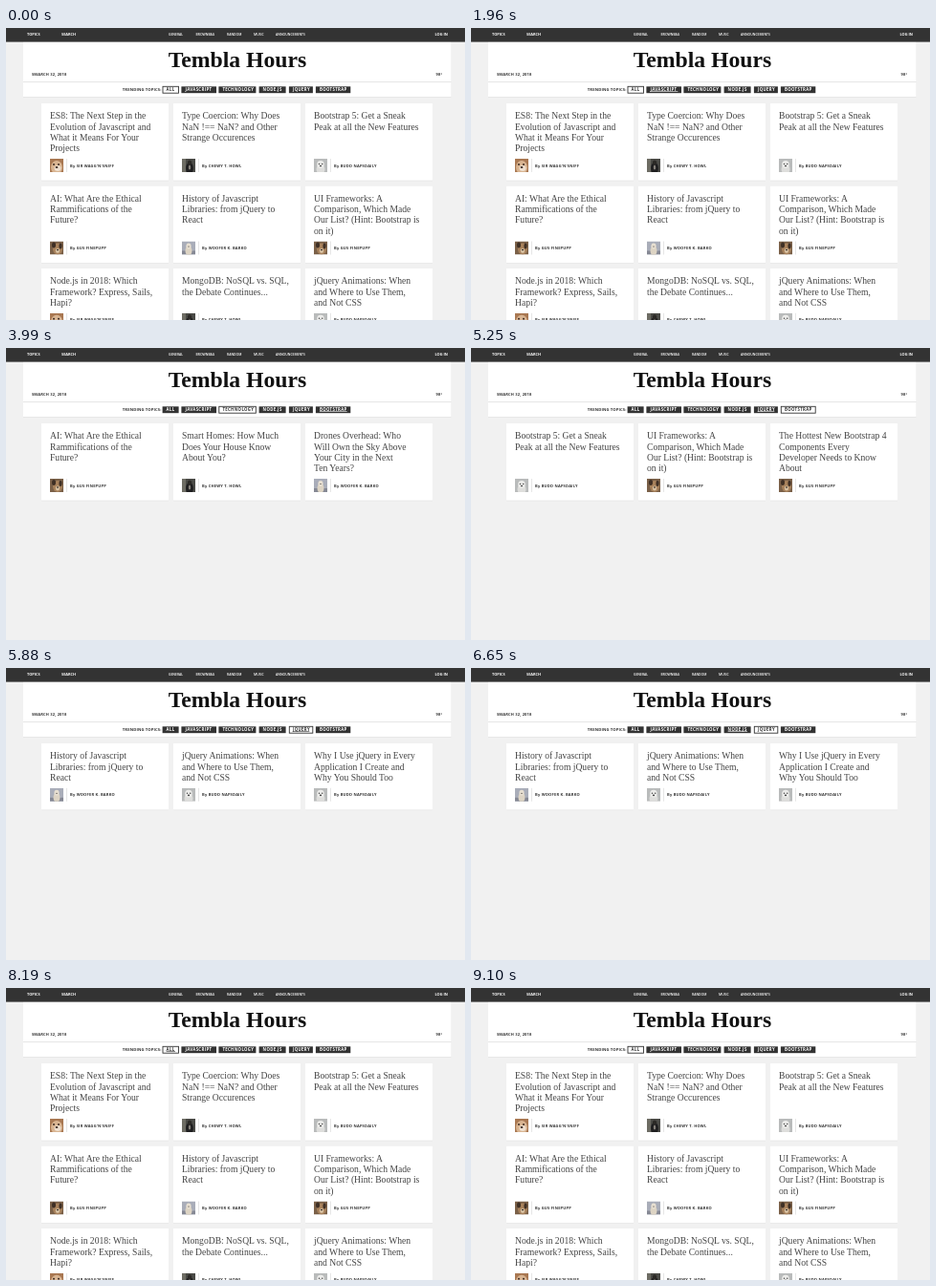
Animation, 480 px wide and 306 px high, one loop 9170 ms. Source, as an HTML page:

```html
<!DOCTYPE html>
<html lang="en">
<head>
<meta charset="utf-8">
<title>Tembla Hours</title>
<style>
  html, body { margin: 0; width: 100%; height: 100%; overflow: hidden; background: #f1f1f1; }
  svg { display: block; }
  text { font-family: "Open Sans", "Noto Sans", sans-serif; fill: #333; white-space: pre; }
  .title { font: bold 23.7px "Liberation Serif", "Noto Serif", serif; fill: #111; text-anchor: middle; }
  .head { font: 9.6px "Liberation Serif", "Noto Serif", serif; fill: #444; }
  .by { font-size: 4px; font-weight: 700; letter-spacing: .22px; }
  .tab { font-size: 4.3px; font-weight: 700; letter-spacing: .36px; }
  .label { font-size: 4.2px; font-weight: 700; letter-spacing: .12px; }
  .info { font-size: 4px; font-weight: 700; letter-spacing: .17px; }
  .main { font-size: 3.9px; font-weight: 700; fill: #fff; }
  .nav { font-size: 3.4px; font-weight: 600; fill: #fff; }
</style>
</head>
<body>
<svg id="stage" width="480" height="306" viewBox="0 0 480 306"></svg>
<script>
const LOOP = 9170;
const stage = document.getElementById('stage');

const rect = (x, y, w, h, fill, extra = '') =>
  `<rect x="${x}" y="${y}" width="${w}" height="${h}" fill="${fill}" ${extra}/>`;
const text = (cls, x, y, s, extra = '') =>
  `<text class="${cls}" x="${x}" y="${y}" ${extra}>${s}</text>`;
const oval = (x, y, rx, ry, fill) =>
  `<ellipse cx="${x}" cy="${y}" rx="${rx}" ry="${ry}" fill="${fill}"/>`;

// Author name and a 14 x 14 portrait of flat shapes
const authors = {
  sir: ["SIR WAGG'N'SNIFF", rect(0, 0, 14, 14, '#a97852') + oval(7, 9, 6, 7, '#d9b592') +
    oval(8, 10, 3.5, 3, '#efe0d0') + oval(4, 6, 1, 1, '#3b2a22') + oval(9, 6, 1, 1, '#3b2a22') + oval(7, 9, 1.4, 1, '#3b2a22')],
  bones: ['CHEWY T. HOWL', rect(0, 0, 14, 14, '#4a4a46') + rect(0, 0, 4, 14, '#6d6c63') +
    oval(8, 10, 4, 6, '#1f1f20') + oval(8, 4, 2.2, 2.6, '#2b2926') + oval(8, 9, 1.2, 2.5, '#85807a')],
  fido: ['BUDD NAPSDAILY', rect(0, 0, 14, 14, '#b9bbbb') + oval(7, 11, 4.5, 5, '#dededc') +
    oval(7, 6, 3.8, 4, '#ececea') + oval(5.5, 5.5, .8, .8, '#555') + oval(8.7, 5.5, .8, .8, '#555') + oval(7, 7.6, 1.1, .8, '#444')],
  max: ['GUS FINEPUPP', rect(0, 0, 14, 14, '#7a6048') + oval(8, 8, 5, 6, '#a8825c') +
    oval(4, 4, 2, 3, '#3e2f25') + oval(11, 5, 1.6, 3, '#3e2f25') + oval(8, 10, 2.2, 2.4, '#d8c1a2') + oval(8, 9, 1, .8, '#29211d')],
  pupper: ['WOOFER K. BARKO', rect(0, 0, 14, 14, '#a9adb9') + rect(0, 10, 14, 4, '#858894') +
    oval(7, 10, 3.5, 5, '#ddd4c4') + oval(7, 5, 2.6, 3, '#e8e0d2') + oval(7, 5.5, .8, .6, '#5c5650')]
};

const articles = {
  es8: ['sir', 'ES8: The Next Step in the|Evolution of Javascript and|What it Means For Your|Projects'],
  nan: ['bones', 'Type Coercion: Why Does|NaN !== NaN? and Other|Strange Occurences'],
  boot: ['fido', 'Bootstrap 5: Get a Sneak|Peak at all the New Features'],
  ai: ['max', 'AI: What Are the Ethical|Rammifications of the|Future?'],
  hist: ['pupper', 'History of Javascript|Libraries: from jQuery to|React'],
  ui: ['max', 'UI Frameworks: A|Comparison, Which Made|Our List? (Hint: Bootstrap is|on it)'],
  node: ['sir', 'Node.js in 2018: Which|Framework? Express, Sails,|Hapi?'],
  mongo: ['bones', 'MongoDB: NoSQL vs. SQL,|the Debate Continues...'],
  anim: ['fido', 'jQuery Animations: When|and Where to Use Them,|and Not CSS'],
  rest: ['pupper', "When to Rest, When to|Spread: Why There Are Two|Meanings Behind '...'"],
  ts: ['sir', 'Typescript: Ten Things you|Should Know Before|Building Your Next Angular|Application'],
  hot: ['max', 'The Hottest New Bootstrap 4|Components Every|Developer Needs to Know|About'],
  why: ['fido', 'Why I Use jQuery in Every|Application I Create and|Why You Should Too'],
  home: ['bones', 'Smart Homes: How Much|Does Your House Know|About You?'],
  drone: ['pupper', 'Drones Overhead: Who|Will Own the Sky Above|Your City in the Next|Ten Years?']
};

// label, text x, box width, articles
const tabs = [
  ['ALL', 167.6, 17, 'es8 nan boot ai hist ui node mongo anim'],
  ['JAVASCRIPT', 187.4, 36.6, 'es8 nan rest ts'],
  ['TECHNOLOGY', 226.4, 39, 'ai home drone'],
  ['NODE.JS', 268.6, 28, 'node mongo'],
  ['JQUERY', 299.9, 25, 'hist anim why'],
  ['BOOTSTRAP', 327.9, 36.4, 'boot ui hot']
];

// [start time, tab index]; -1 means no tab is hovered
const picks = [[0, 0], [2030, 1], [3570, 2], [4550, 5], [5880, 4], [7000, 3], [8190, 0]];
const hovers = [[0, -1], [1610, 1], [2660, -1], [3220, 2], [3850, -1], [3990, 5], [5180, -1], [5250, 4],
  [6160, -1], [6510, 2], [6650, 3], [7140, -1], [7210, 1], [7350, -1], [7420, 0], [8750, -1]];
const at = (list, t) => list.filter(e => e[0] <= t).pop()[1];

function header() {
  const main = [['TOPICS', 22], ['SEARCH', 58], ['LOG IN', 448.5]];
  const nav = [['GENERAL', 170], ['BROWNBAG', 198.5], ['RANDOM', 231], ['MUSIC', 259], ['ANNOUNCEMENTS', 282]];
  return rect(18, 14, 447.5, 58.6, '#e2e2e2') + rect(18, 14, 447.5, 58, '#fff') +
    rect(0, 0, 480, 14.6, '#333') +
    main.map(([s, x]) => text('main', x, 8.3, s)).join('') +
    nav.map(([s, x]) => text('nav', x, 8.2, s)).join('') +
    text('title', 242, 40.5, 'Tembla Hours') +
    text('info', 27, 49.5, 'SMARCH 32, 2018') + text('info', 449.5, 49.5, '98°') +
    rect(18, 56, 447.5, .6, '#d5d5d5') +
    text('label', 121.8, 66.2, 'TRENDING TOPICS:');
}

function tabBar(active, hover) {
  return tabs.map(([label, x, w], i) => {
    const on = i === active, ink = on ? '#333' : '#fff';
    const box = on
      ? rect(x - 3.6, 61.3, w - .5, 6.9, '#fff', 'stroke="#333" stroke-width=".9"')
      : rect(x - 4, 61.3, w, 6.9, '#333');
    const line = i === hover ? rect(x, 66.3, w - 7.6, .6, ink) : '';
    return box + text('tab', x, 65.9, label, `style="fill:${ink}"`) + line;
  }).join('');
}

function card([who, title], x, y, h) {
  const [name, portrait] = authors[who];
  const lines = title.split('|').map((s, i) => text('head', x + 9, y + 16.4 + i * 11.2, s)).join('');
  return rect(x, y, 133, h + .7, '#e3e3e3') + rect(x, y, 133, h, '#fff') + lines +
    `<svg x="${x + 9}" y="${y + h - 22.7}" width="14" height="14">${portrait}</svg>` +
    rect(x + 26.2, y + h - 22.7, .5, 14, '#ccc') +
    text('by', x + 30, y + h - 14.2, 'By ' + name);
}

function cards(active) {
  const list = tabs[active][3].split(' ').map(k => articles[k]);
  let y = 79, out = '';
  for (let i = 0; i < list.length; i += 3) {
    const row = list.slice(i, i + 3);
    const gap = (419 - 133 * row.length) / (row.length + 1);
    const h = 35.9 + 11.2 * Math.max(...row.map(a => a[1].split('|').length));
    out += row.map((a, j) => card(a, 32 + gap + j * (133 + gap), y, h)).join('');
    y += h + 5.8;
  }
  return out;
}

let shown = '';
function frame() {
  const t = performance.now() % LOOP;
  const active = at(picks, t), hover = at(hovers, t);
  const key = active + '/' + hover;
  if (key !== shown) {
    shown = key;
    stage.innerHTML = header() + tabBar(active, hover) + cards(active);
  }
  requestAnimationFrame(frame);
}
frame();
</script>
</body>
</html>
```
